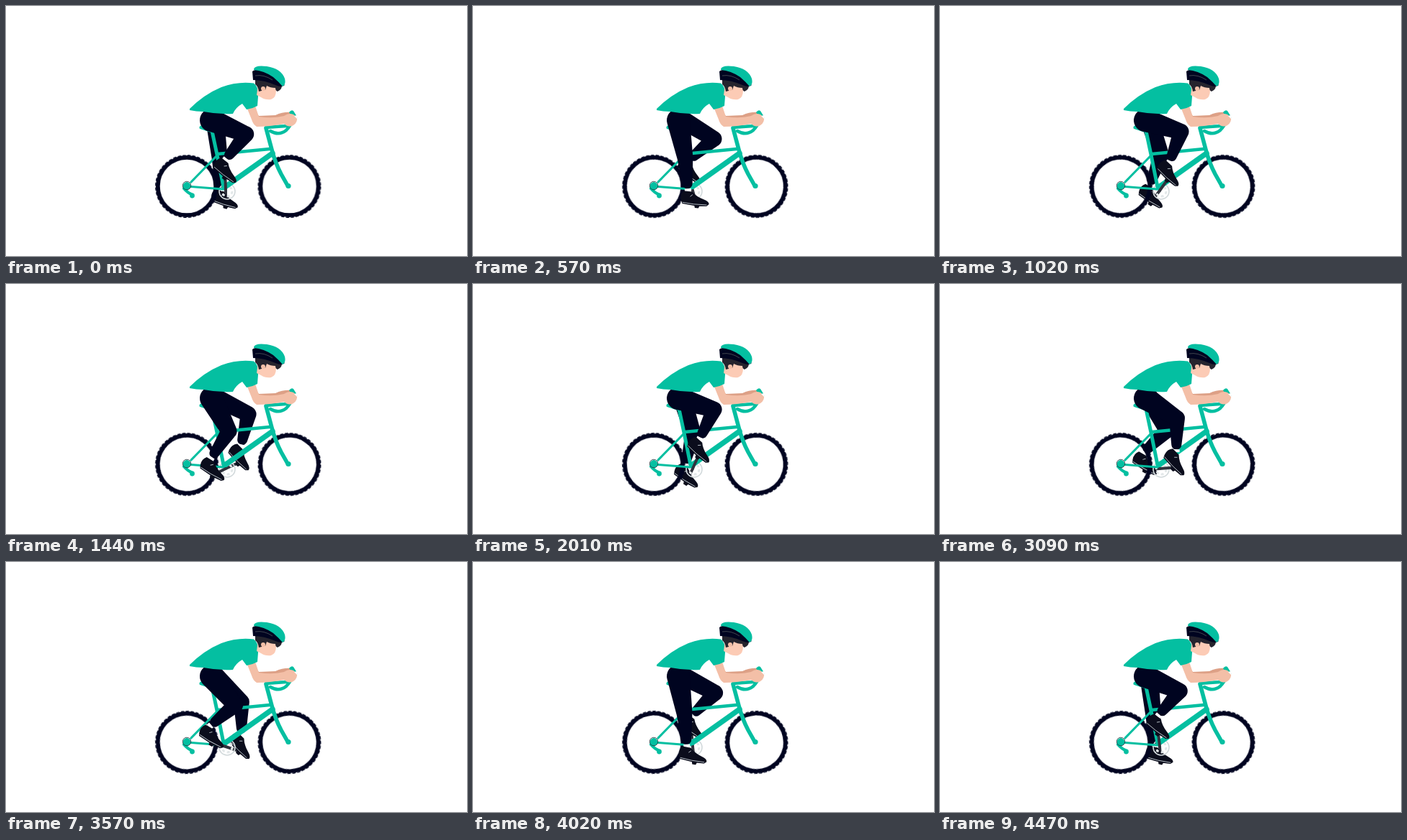
Write an HTML page that moves like this. It is 640 by 348 pixels and loops after 4500 ms.

```html
<!DOCTYPE html>
<html lang="en">
<head>
<meta charset="utf-8">
<title>Cyclist</title>
<style>
  html, body { margin: 0; width: 100%; height: 100%; overflow: hidden; background: #fff; }
  svg { display: block; width: 100vw; height: 100vh; }
  .teal { fill: #04bfa1; }
  .tube { fill: none; stroke: #04bfa1; stroke-linecap: round; stroke-linejoin: round; }
  .navy { fill: #000420; }
  .shoe { fill: #0b0d1c; }
  .sole { fill: none; stroke: #b9c2c8; stroke-width: .9; }
  .sock { stroke: #fff; stroke-width: 9; }
  .crank { stroke: #30333d; stroke-width: 4; stroke-linecap: round; }
  .wheel { transform-box: fill-box; transform-origin: center; animation: spin 900ms linear infinite; }
  .tyre { fill: none; stroke: #000420; stroke-width: 5.8; }
  .knobs { fill: none; stroke: #000420; stroke-width: 1.4; stroke-dasharray: 4.4 2.4; }
  @keyframes spin { to { transform: rotate(360deg); } }
</style>
</head>
<body>
<svg viewBox="0 0 640 348">
  <defs>
    <g id="wheel">
      <circle class="tyre" r="40.2"/>
      <circle class="knobs" r="43.2"/>
    </g>
    <g id="shoe">
      <path class="shoe" d="M-22-3Q-25-11-20-17H-8Q-2-11 9-8Q17-6 17-2L14 1L4 2L3 5H-2L-3 2L-20 1Z"/>
      <path class="sole" d="M-20-.8L-4 0L14-.8M-7-13L-10-10"/>
    </g>
  </defs>

  <g id="far">
    <line class="crank"/><path class="navy"/><line class="sock"/><use href="#shoe"/>
  </g>

  <g transform="translate(251 251)"><use class="wheel" href="#wheel"/></g>
  <g transform="translate(393.5 251)"><use class="wheel" href="#wheel"/></g>

  <g fill="none" stroke="#d3dadc">
    <circle cx="307" cy="258" r="11" stroke-width="1.6"/>
    <circle cx="307" cy="258" r="7" stroke="#e3e8e9" stroke-width="3" stroke-dasharray="4 3.3"/>
  </g>
  <g class="tube">
    <path stroke-width="3.2" d="M251 251L302 255M257 245L293 208"/>
    <path stroke-width="5" d="M286 174L293 207L302 252"/>
    <path stroke-width="4.6" d="M294 206L366 199"/>
    <path stroke-width="7.4" d="M304 252L370 205"/>
    <path stroke-width="5.6" d="M361 170L369 200Q374 219 382 234L391 250"/>
    <path stroke-width="4.4" d="M361 169L389 167M367 174Q379 181 389 173Q396 166 398 157"/>
    <path stroke-width="4.2" d="M247 254Q252 260 259 263"/>
    <path stroke-width="5" d="M271 169L286 174"/>
  </g>
  <circle class="teal" cx="392" cy="250.5" r="3.6"/>
  <circle class="teal" cx="258.5" cy="264" r="3.4"/>
  <circle class="teal" cx="251" cy="250.5" r="5.4"/>
  <circle cx="251" cy="250" r="5.8" fill="none" stroke="#28363f" stroke-width=".8"/>

  <g id="near">
    <line class="crank"/><path class="navy"/><line class="sock"/><use href="#shoe"/>
  </g>

  <path fill="#dda086" d="M343 141L351 153L374 152Q385 147 396 148L397 156L352 161Z"/>
  <path class="teal" d="M393 148Q396 144 399 146L404 154Q405 159 400 159Z"/>
  <path fill="#f3bfa7" d="M335 143L346 139L351 154Q370 157 386 153Q393 148 399 151L404 155Q405 162 399 166Q393 170 386 164Q365 168 348 168Q343 165 341 158Z"/>
  <path fill="#fff" d="M400 153L404 152L404 157Z"/>

  <path class="teal" d="M255 143Q275 123 299 113Q322 104.500 344 107.500Q351 112 350 126L349 139Q342 143 334 144L328 136Q319 141 315 150Q294 151 274 147Q264 147 255 145Z"/>

  <path fill="#fccbb5" d="M350 109L374 108L375 117Q375 128 368 130Q360 131 354 127L348 124Z"/>
  <path fill="#25242e" d="M346 101L383 109Q384 116 377 119Q374 118 374 114Q367 114 362 111L360 117Q357 112 355 118L351 119Q350 112 346 109Z"/>
  <circle cx="357" cy="115" r="3" fill="#f3bfa7"/>
  <path class="navy" d="M342 91Q347 87 360 89L387 110Q383 114 374 110Q358 103 343 103Z"/>
  <path fill="none" stroke="#41454f" stroke-width="1" d="M346 97Q358 95 370 103"/>
  <path class="teal" d="M344 88Q345 82 362 84Q382 87 387 101Q389 109 384 112Q379 106 371 99Q358 90 344 89Z"/>
</svg>

<script>
  const LOOP = 4500, STEP = 30, TAU = Math.PI * 2;
  const axle = [305, 257], crankLen = 20, thigh = 52, shin = 46;

  // Pedal stroke: step, turns done, turns per step
  const stroke = [
    [0, 0, .012], [19, .46, .033], [48, 1.68, .031], [67, 2.07, .026],
    [87, 2.71, .033], [119, 3.8, .0365], [149, 4.988, .012], [150, 5, .012]
  ];

  function turnsAt(s) {
    let i = 0;
    while (i < stroke.length - 2 && s >= stroke[i + 1][0]) i++;
    const [s0, a, va] = stroke[i], [s1, b, vb] = stroke[i + 1];
    const d = s1 - s0, u = (s - s0) / d, w = 1 - u;
    return a * w * w * (1 + 2 * u) + b * u * u * (3 - 2 * u)
         + d * u * w * (va * w - vb * u);
  }

  const polar = ([x, y], r, a) => [x + r * Math.cos(a), y + r * Math.sin(a)];
  const mix = (a, b, k) => [a[0] + (b[0] - a[0]) * k, a[1] + (b[1] - a[1]) * k];

  // Tapered capsule around two circles
  function capsule(a, ra, b, rb) {
    const dx = b[0] - a[0], dy = b[1] - a[1];
    const d = Math.atan2(dy, dx), k = Math.acos((ra - rb) / Math.hypot(dx, dy));
    return `M${polar(a, ra, d - k)}L${polar(b, rb, d - k)}A${rb} ${rb} 0 0 1 ${polar(b, rb, d + k)}` +
           `L${polar(a, ra, d + k)}A${ra} ${ra} 0 1 1 ${polar(a, ra, d - k)}Z`;
  }

  function line(el, a, b) {
    el.setAttribute('x1', a[0]); el.setAttribute('y1', a[1]);
    el.setAttribute('x2', b[0]); el.setAttribute('y2', b[1]);
  }

  function kneeOf(hip, ankle) {
    const dx = ankle[0] - hip[0], dy = ankle[1] - hip[1];
    const d = Math.min(Math.hypot(dx, dy), thigh + shin - .1);
    const bend = Math.acos((thigh * thigh + d * d - shin * shin) / (2 * thigh * d));
    return polar(hip, thigh, Math.atan2(dy, dx) - bend);
  }

  function makeLeg(id, hip, hipR) {
    const [crank, pants, sock, shoe] = document.getElementById(id).children;
    return turn => {
      const a = turn * TAU;
      const pedal = polar(axle, crankLen, a - TAU / 4);
      // The foot levels out at the bottom of the stroke
      const tilt = 38 + 8 * Math.sin(a) - 34 * Math.exp(12 * (Math.cos(a - 2.85) - 1));
      const r = tilt * TAU / 360;
      const ankle = polar(pedal, Math.hypot(14, 18), Math.atan2(-18, -14) + r);
      const knee = kneeOf(hip, ankle);
      const cuff = mix(knee, ankle, .8);
      line(crank, axle, pedal);
      line(sock, mix(knee, ankle, .94), mix(knee, ankle, 1.03));
      pants.setAttribute('d', capsule(hip, hipR, knee, 11) + capsule(knee, 11, cuff, 7));
      shoe.setAttribute('transform', `translate(${pedal}) rotate(${tilt})`);
    };
  }

  const far = makeLeg('far', [290, 158], 13);
  const near = makeLeg('near', [285, 159], 16);

  function draw(now) {
    const turn = turnsAt(now % LOOP / STEP);
    far(turn + .5);
    near(turn - .005);
  }

  const start = performance.now();
  function frame() {
    draw(performance.now() - start);
    requestAnimationFrame(frame);
  }
  frame();
</script>
</body>
</html>
```
